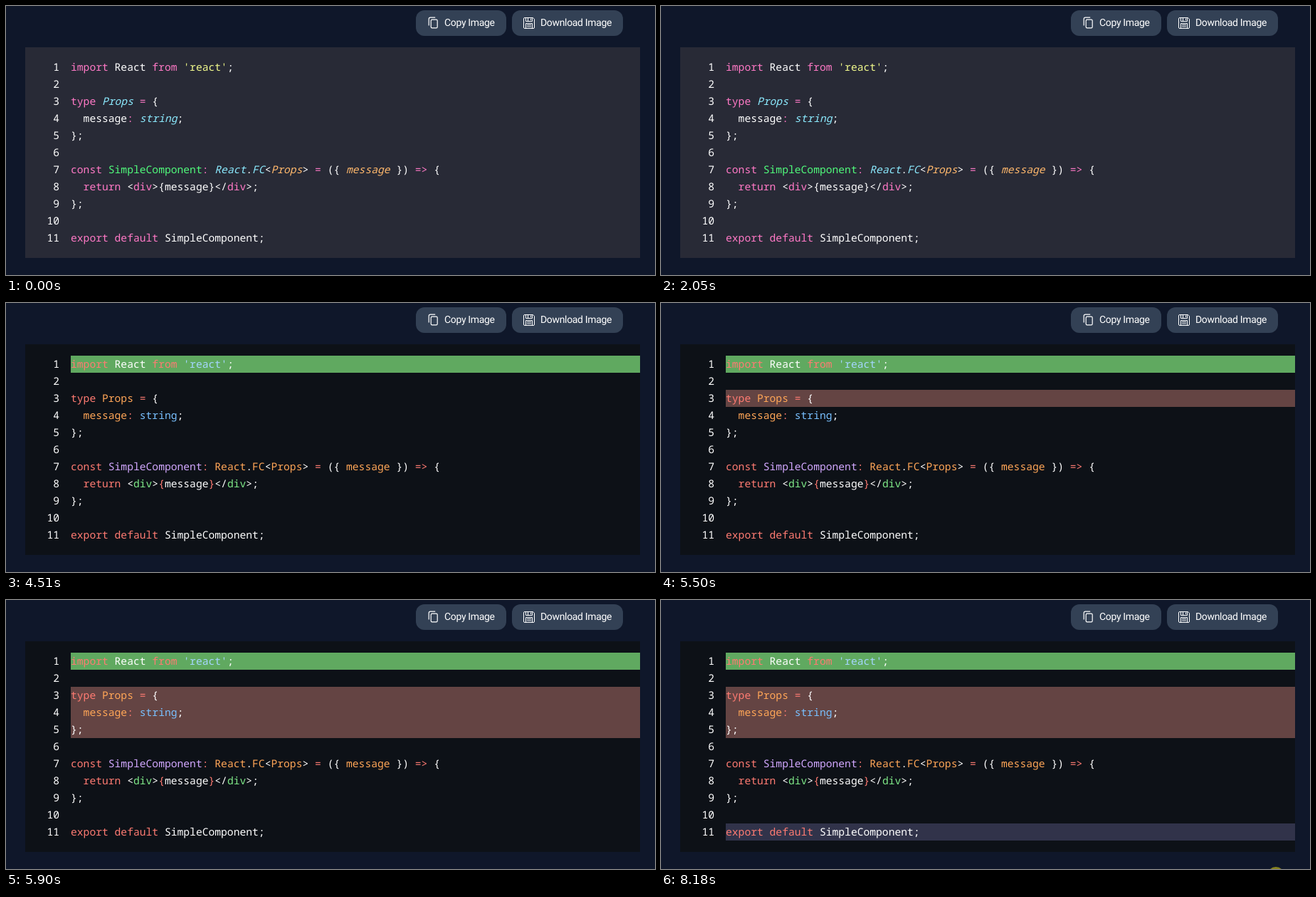
An HTML page for the animation above (8.25 s loop, 912 px wide and 378 px high).

```html
<!DOCTYPE html>
<html lang="en">
<head>
<meta charset="utf-8">
<style>
  html, body { margin: 0; width: 100%; height: 100%; overflow: hidden; background: #0f172a; }
  #stage { position: relative; width: 912px; height: 378px; overflow: hidden; }
  .button {
    position: absolute; top: 6px; height: 36px; border-radius: 12px; background: #334155;
    color: #fff; font: 14px/36px Roboto, sans-serif; letter-spacing: -.33px;
    text-rendering: geometricPrecision; white-space: nowrap;
  }
  .button span { position: absolute; left: 40px; }
  .button svg { position: absolute; left: 16px; top: 9px; fill: none; stroke: #fff; stroke-width: 1.2; }
  #panel {
    position: absolute; left: 27px; top: 58px; width: 864px; height: 296px; color: #fff;
    font: 500 14.66px/24px "Noto Sans Mono", monospace; text-rendering: geometricPrecision;
    font-variant-ligatures: none;
  }
  .row { position: absolute; left: 64px; width: 800px; height: 24px; white-space: pre; }
  .num { position: absolute; right: 816px; }
  #pointer {
    position: absolute; left: 852px; top: 375px; width: 24px; height: 24px;
    border-radius: 50%; background: #87831f;
  }
</style>
</head>
<body>
<div id="stage">
  <div class="button" style="left:576px;width:127px">
    <svg width="18" height="18"><rect x="5.2" y="4.2" width="9" height="11.6" rx="1.6"/><path d="M2.2 12.5V3.2a2 2 0 0 1 2-2h7"/></svg>
    <span>Copy Image</span>
  </div>
  <div class="button" style="left:711px;width:156px">
    <svg width="18" height="18" style="stroke-width:1"><path d="M.5 3A1.5 1.5 0 0 1 2 1.5h11.5l2 2V15a1.5 1.5 0 0 1-1.5 1.5H2A1.5 1.5 0 0 1 .5 15zM3.5 1.5v5h9v-5M6.5 1.5v5M10.5 2.5V5M3.5 16.5v-7h9v7M5 11.5h6M5 14h6"/></svg>
    <span>Download Image</span>
  </div>
  <div id="panel"></div>
  <div id="pointer"></div>
</div>
<script>
// ~ switches tokens on and off; the first letter of a token is its kind
const source = `~kimport~ React ~kfrom~ ~q'~~sreact~~q'~~n;~

~ttype~ ~yProps~ ~o=~ ~n{~
  ~mmessage~~o:~ ~cstring~~n;~
~n};~

~tconst~ ~fSimpleComponent~~o:~ ~yReact~~n.~~yFC~~n<~~pProps~~n>~ ~o=~ ~n({~ ~vmessage~ ~n})~ ~a=>~ ~n{~
  ~kreturn~ ~n<~~ddiv~~n>~~b{~~xmessage~~b}~~n</~~ddiv~~n>;~
~n};~

~kexport~ ~kdefault~ SimpleComponent~n;~`;

const pink = '#ff79c6', cyan = '#89ddff', red = '#ff7b72', orange = '#ffa657', coral = '#f78c6c';
const dracula = {
  bg: '#282a36', k: pink, t: pink, o: pink, a: pink, d: pink, q: '#e9f284', s: '#f1fa8c',
  y: '#8be9fd', c: '#8be9fd', p: '#ffb86c', v: '#ffb86c', f: '#50fa7b', italic: 'ycpv'
};
const ocean = {
  bg: '#06070b', num: '#bfc7c5', k: cyan, t: '#c792ea', o: cyan, a: '#c792ea', d: coral, q: cyan,
  s: '#c3e88d', y: '#ffc46c', c: '#babed8', p: '#ffc46c', v: coral, f: '#82aaff',
  b: cyan, x: coral, n: cyan, italic: ''
};
const dark = {
  bg: '#0d1117', k: red, t: red, o: red, a: red, d: '#7ee787', q: '#a5d6ff', s: '#a5d6ff',
  y: orange, c: '#79c0ff', p: orange, v: orange, f: '#d2a8ff', m: orange, b: red, italic: ''
};

const panel = document.getElementById('panel');
const pointer = document.getElementById('pointer');
const make = (parent, tag, kind, text = '') => {
  const el = parent.appendChild(document.createElement(tag));
  el.className = kind;
  el.textContent = text;
  return el;
};

const rows = source.split('\n').map((line, i) => {
  const row = make(panel, 'div', 'row');
  row.style.top = 16 + 24 * i + 'px';
  make(row, 'span', 'num', i + 1);
  line.split('~').forEach((part, j) => {
    if (j % 2) make(row, 'i', part[0], part.slice(1));
    else row.append(part);
  });
  return row;
});
const tokens = [...panel.querySelectorAll('i, .num')];

let current;
function setTheme(theme) {
  if (theme === current) return;
  current = theme;
  panel.style.background = theme.bg;
  for (const el of tokens) {
    el.style.color = theme[el.className] || '#fff';
    el.style.fontStyle = theme.italic.includes(el.className) ? 'italic' : 'normal';
  }
}

function highlight(line, t) {
  if (line === 1 && t >= 4510) return '#60a960';
  if (line === 3 && t >= 5500 && t < 5700) return '#644443';
  if (line >= 3 && line <= 5 && t >= 5900) return '#644443';
  if (line === 11 && t >= 7290) return '#31334a';
  return '';
}

function draw(now) {
  const t = now % 8250;
  setTheme(t >= 3650 ? dark : t >= 1190 && t < 2050 ? ocean : dracula);
  rows.forEach((row, i) => row.style.background = highlight(i + 1, t));
  pointer.style.visibility = t >= 8180 ? 'visible' : 'hidden';
  requestAnimationFrame(draw);
}
draw(performance.now());
</script>
</body>
</html>
```
